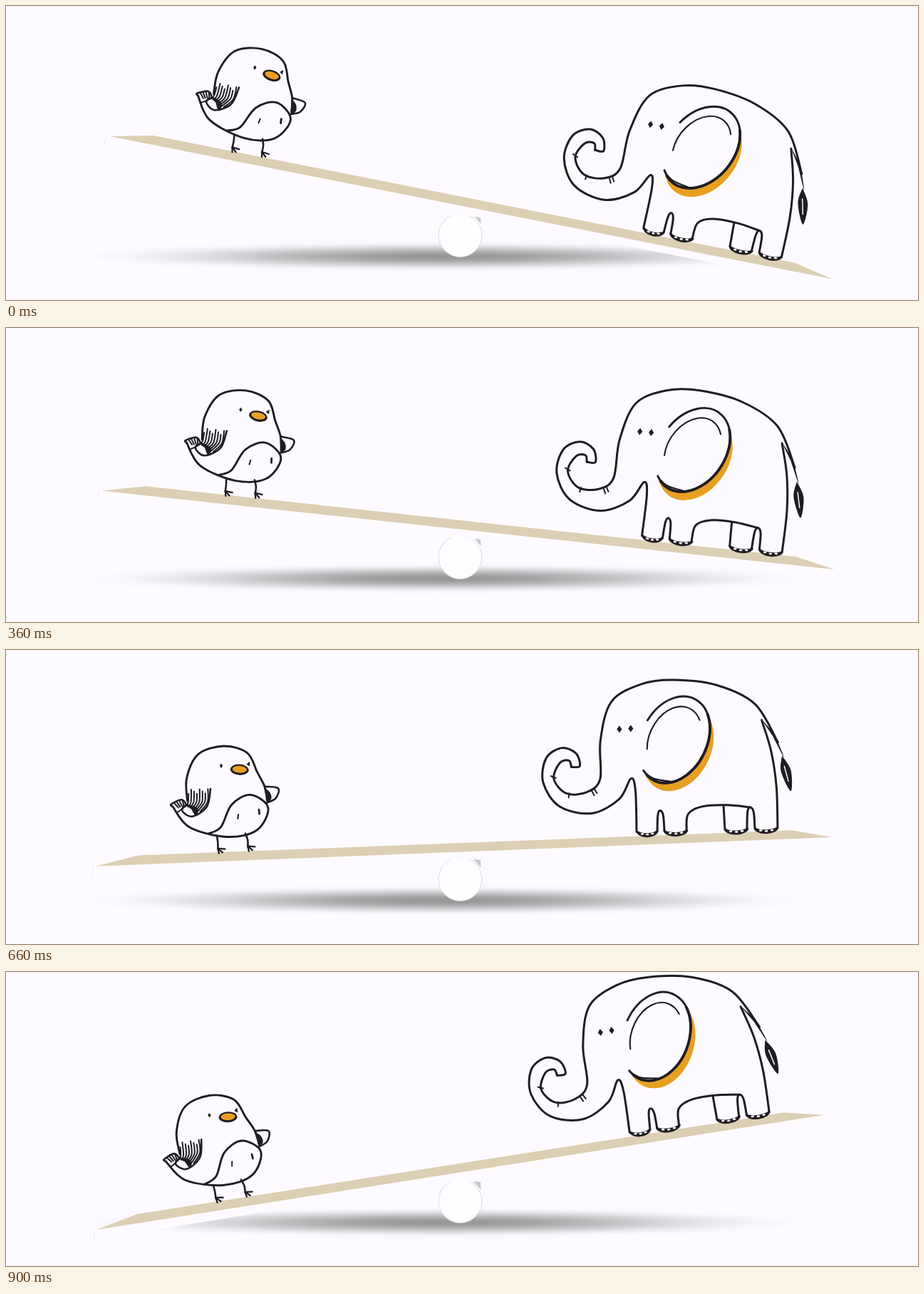
An HTML page with a canvas that plays this animation: 1280 by 413 pixels, repeating every 0.93 s.

```html
<!DOCTYPE html>
<html lang="en">
<head>
<meta charset="utf-8">
<title>Seesaw</title>
<style>
  html, body { margin: 0; width: 100%; height: 100%; overflow: hidden; background: #fdfbff; }
  canvas { display: block; width: 1280px; height: 413px; }
</style>
</head>
<body>
<canvas id="stage" width="1280" height="413"></canvas>
<script>
const ctx = document.getElementById('stage').getContext('2d');
const PAPER = '#fdfbff', INK = '#1f1d21', TAN = '#dccfb3', ORANGE = '#e7a024';
const LOOP = 930, HOLD = 210, STEP = 30, STEPS = 24, LEVEL = 14;
const TURN = 0.84 * Math.PI / 180;
const TAU = 2 * Math.PI;

function fill(color) {
  ctx.fillStyle = color;
  ctx.fill();
}

function stroke(width, color = INK) {
  ctx.lineWidth = width;
  ctx.strokeStyle = color;
  ctx.stroke();
}

// Smooth curve through a few points given as x, y pairs
function trace(...p) {
  const last = p.length / 2 - 1;
  const at = i => {
    const j = 2 * Math.max(0, Math.min(last, i));
    return [p[j], p[j + 1]];
  };
  ctx.beginPath();
  ctx.moveTo(p[0], p[1]);
  for (let i = 0; i < last; i++) {
    const [a, b, c, d] = [at(i - 1), at(i), at(i + 1), at(i + 2)];
    ctx.bezierCurveTo(
      b[0] + (c[0] - a[0]) / 6, b[1] + (c[1] - a[1]) / 6,
      c[0] - (d[0] - b[0]) / 6, c[1] - (d[1] - b[1]) / 6, c[0], c[1]);
  }
}

function line(width, ...points) {
  trace(...points);
  stroke(width);
}

function blob(...points) {
  trace(...points);
  fill(INK);
}

function poly(color, ...p) {
  ctx.beginPath();
  for (let i = 0; i < p.length; i += 2) ctx.lineTo(p[i], p[i + 1]);
  fill(color);
}

function oval(x, y, rx, ry, tilt = 0, from = 0, to = TAU) {
  ctx.beginPath();
  ctx.ellipse(x, y, rx, ry, tilt, from, to);
}

const diamond = (x, y, w, h) => poly(INK, x, y - h, x + w, y, x, y + h, x - w, y);

function shadow(x, y, rx, ry, alpha) {
  ctx.save();
  ctx.translate(x, y);
  ctx.scale(rx, ry);
  const g = ctx.createRadialGradient(0, 0, 0, 0, 0, 1);
  for (let r = 0; r <= 1; r += 0.125) {
    g.addColorStop(r, `rgba(70,70,70,${alpha * Math.cos(r * Math.PI / 2) ** 2})`);
  }
  ctx.fillStyle = g;
  ctx.fillRect(-1, -1, 2, 2);
  ctx.restore();
}

function drawGround() {
  shadow(625, 351, 620, 27, 0.06);
  shadow(612, 352, 510, 21, 0.53);
  oval(637.5, 322, 30.5, 30.5);
  fill('#fefdff');
  stroke(1, '#dcdbde');
  poly('#c9c8ca', 656, 294, 666, 295, 666.5, 306);
  // The ball merges into the plank's pale front
  poly(PAPER, 624, 289, 652, 289, 650, 294, 626, 294);
}

function drawPlank() {
  poly(PAPER, 122, 289, 1162, 279, 1162, 288, 122, 302);
  ctx.beginPath();
  ctx.rect(122.5, 290, 0, 11.5);
  stroke(1, '#e9e7ea');
  poly(TAN, 127, 289, 187, 275.5, 1105, 267, 1161, 278.5);
}

function drawBirdLeg(x, y, ankle) {
  line(2.6, x, y, ankle, y + 9, ankle, y + 19);
  for (let i = 0; i < 3; i++) {
    const a = 0.1 + i * 0.65, r = 10 - i * 1.5;
    line(2.3, ankle, y + 18, ankle + r * Math.cos(a), y + 18 + r * Math.sin(a));
  }
}

function drawBird() {
  drawBirdLeg(298, 251, 299);
  drawBirdLeg(338, 249, 341);

  // Head, then tail to body to belly
  line(2.9, 258, 201, 258, 169, 275, 136, 311, 125.5, 344, 136, 357, 163, 367, 184, 370, 204);
  line(2.9, 237, 208, 260, 238, 312, 253, 354, 245, 371, 214, 347, 195, 320, 208, 304, 239, 286, 248);
  line(2, 329, 222, 328, 228);
  line(2.8, 358, 216, 358.5, 222);

  // Tail and left wing
  line(2.6, 237, 208, 235, 205, 250, 199, 257, 207);
  line(2, 242, 217, 249, 213, 253, 207);
  line(2.6, 258, 206, 250, 214, 264, 223, 285, 210, 291, 185);
  blob(254, 206, 266, 208, 273, 214, 269, 222, 263, 212);
  for (let i = 0; i < 4; i++) line(2, 239 + i * 4, 203 - i, 245 + i * 2.6, 210 - i);
  for (let i = 0; i < 8; i++) {
    const x = 260 + i * 3.9;
    line(2, x, 191 - (i * 2 % 3) * 3, x - 1, 203, x - 4 - i * 1.1, 208 + i * 1.2);
  }

  // Right wing
  line(2.6, 367, 184, 386, 187, 382, 201, 369, 207);
  blob(366, 185, 374, 192, 376, 201, 370, 207);

  // Face
  diamond(307, 153, 2.2, 3.3);
  poly(INK, 347, 148, 347, 155, 342.5, 152);
  oval(332.5, 159, 11.5, 6.2, 0.1);
  fill(ORANGE);
  stroke(2.2);
  oval(332.5, 159, 11.5, 6.2, 0.1, 0, Math.PI);
  stroke(3);
}

function drawFoot(x, w) {
  const m = x + w / 2;
  oval(m, 262, w / 2 + 1.4, 9, 0, 0, Math.PI);
  fill(INK);
  oval(m, 261, w / 2 - 1.4, 4, 0, 0, Math.PI);
  fill(PAPER);
  for (let i = -1; i <= 1; i++) {
    oval(m + i * w / 4, 267 - Math.abs(i), 2.3, 1.4);
    fill(PAPER);
  }
}

function drawEar() {
  const tilt = -62 * Math.PI / 180, x = 943.6, y = 135;
  oval(x + 5, y + 11.5, 64, 46, tilt);
  fill(ORANGE);
  oval(x, y, 64, 46, tilt);
  fill(PAPER);
  oval(x, y, 64, 46, tilt, -1.45, 3.58);
  stroke(2.9);
  oval(x, y, 64, 46, tilt, 0.6, 3.4);
  stroke(3.8);
  oval(x, y, 49, 35, tilt, -2.2, 0.6);
  stroke(2.1);
  line(2.2, 900, 179, 914, 189, 939, 194);
}

// Narrow arch between two neighbouring legs
const arch = (x, w, top) =>
  line(3, x, 263, x + 1.5, top + 6, x + w / 2, top, x + w - 1, top + 7, x + w, 263);

function drawElephant() {
  const feet = [[888, 28], [926, 32], [1011, 32], [1053, 32]];
  ctx.fillStyle = PAPER;
  for (const [x, w] of feet) ctx.fillRect(x, 238, w, 26);
  for (const [x, w] of feet) drawFoot(x, w);

  // Trunk to chest, then inner trunk to back
  line(3, 798, 169, 810, 168, 805, 150, 785, 142, 763, 156, 758, 190, 780, 224,
    825, 235, 864, 216, 881, 188, 887, 204, 887, 263);
  line(3, 798, 169, 795, 160, 782, 163, 773, 185, 790, 206, 819, 205, 838, 187,
    840, 133, 857, 79, 900, 55.5, 945, 51, 1005, 60, 1058, 88, 1089, 143);
  for (const [x, y, dx, dy] of [[769, 181, 7, 3], [794, 206, -1, 6], [825, 202, 4, 8], [829, 200, 4, 7]]) {
    line(2, x, y, x + dx, y + dy);
  }

  // Legs and belly
  arch(916, 10, 234);
  arch(1042, 11, 233);
  line(3, 957, 263, 960, 240, 980, 230, 1015, 229, 1047, 233);
  line(3, 1010, 230, 1011, 263);
  line(3, 1085, 263, 1085, 205, 1079, 155, 1067, 111);

  // Tail
  blob(1066, 109, 1084, 132, 1097, 165, 1082, 134);
  blob(1094, 162, 1106, 183, 1105, 212, 1092, 184, 1094, 162);
  trace(1097, 177, 1102, 198);
  stroke(1.5, PAPER);

  drawEar();
  diamond(867, 118, 3.6, 5);
  diamond(883, 117.5, 3.6, 5);
}

function draw(ms) {
  const t = ms % LOOP;
  const k = t < HOLD ? 0 : Math.min(STEPS, 1 + Math.floor((t - HOLD) / STEP));
  const tilt = LEVEL - k;
  ctx.fillStyle = PAPER;
  ctx.fillRect(0, 0, 1280, 413);
  drawGround();

  // Turn about the group's centre while that centre drifts evenly
  ctx.save();
  ctx.translate(642 + tilt * 2.18, 176 + tilt * 0.09);
  ctx.rotate(tilt * TURN);
  ctx.translate(-642, -176);
  drawPlank();
  drawBird();
  drawElephant();
  ctx.restore();
}

ctx.lineCap = ctx.lineJoin = 'round';
const start = performance.now();
function tick() {
  draw(performance.now() - start);
  requestAnimationFrame(tick);
}
tick();
</script>
</body>
</html>
```
